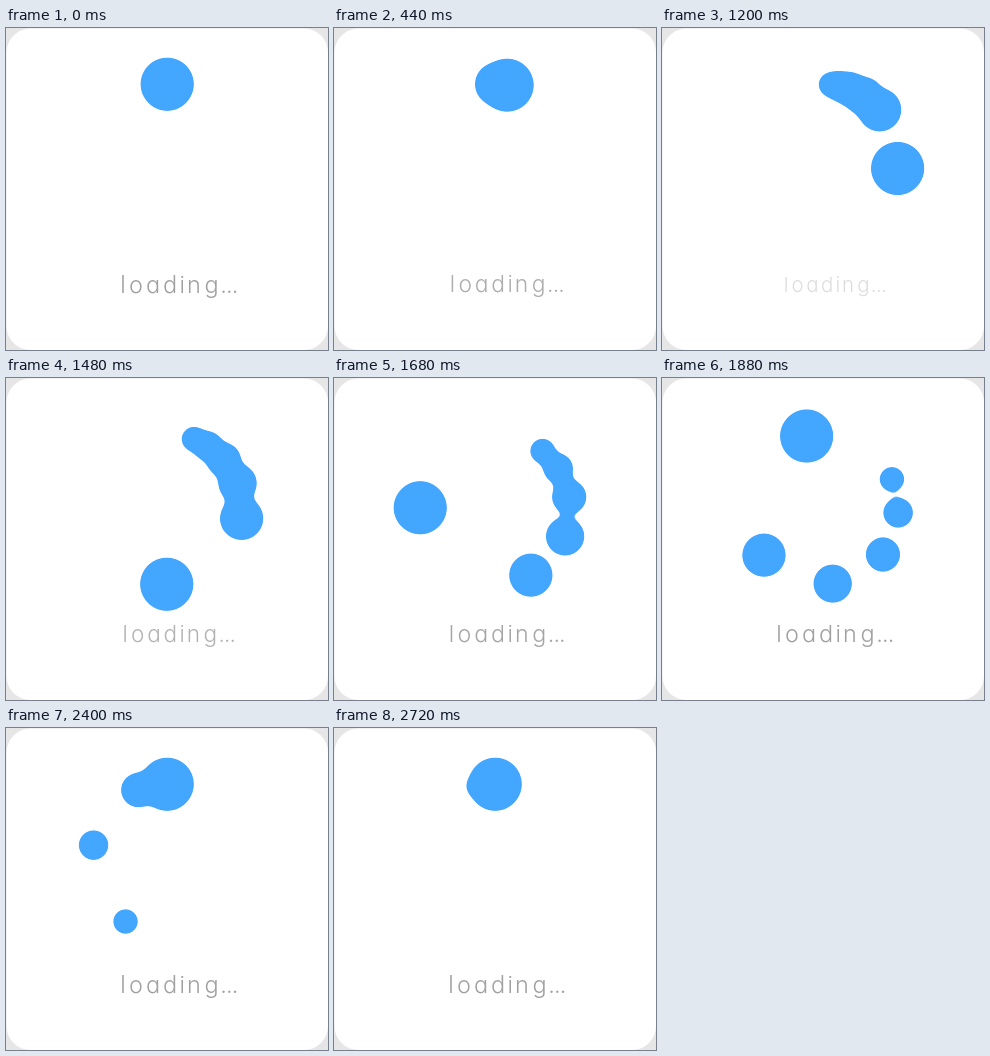
An HTML page for the animation above (3.2 s loop, 322 by 322 pixels).

```html
<!DOCTYPE html>
<html lang="en">
<head>
<meta charset="utf-8">
<title>Loading</title>
<style>
  html, body { margin: 0; width: 100%; height: 100%; overflow: hidden; background: #e6e6e6; }
  svg { display: block; width: 100%; height: 100%; }
  text {
    font: 350 23.5px Inter, "Open Sans", sans-serif;
    font-feature-settings: "cv11";
    font-optical-sizing: none;
    text-anchor: middle;
    fill: #a0a0a0;
  }
</style>
</head>
<body>
<svg viewBox="0 0 322 322" xmlns="http://www.w3.org/2000/svg">
  <defs>
    <filter id="goo" filterUnits="userSpaceOnUse" x="30" y="0" width="262" height="262" color-interpolation-filters="sRGB">
      <feGaussianBlur stdDeviation="5"/>
      <feColorMatrix values="1 0 0 0 0  0 1 0 0 0  0 0 1 0 0  0 0 0 14 -6.5"/>
    </filter>
  </defs>
  <rect x=".5" y=".5" width="321.5" height="321.5" rx="24" fill="#fff"/>
  <g id="drops" filter="url(#goo)" fill="#43a6ff"></g>
  <text id="label" y="264.5" x="117 130 147 164 176.3 188 205.5 217.5 223.3 229">loading...</text>
</svg>
<script>
const LOOP = 3200, STEP = 40, TURN = 1980, LAG = 140;
const CENTER = { x: 161.2, y: 131.2 }, ORBIT = 75;
const LABEL = { x: 173, y: 257, down: 940, up: 1940, shrink: 0.2 };
const RADII = [27, 22.1, 19.7, 17.7, 15.4, 13];

const group = document.getElementById('drops');
const label = document.getElementById('label');

const drops = RADII.map((r, i) => {
  const node = document.createElementNS('http://www.w3.org/2000/svg', 'circle');
  node.setAttribute('r', r);
  group.appendChild(node);
  return { node, delay: i ? LAG * (i + 1) : 0 };
});

// Cubic bezier easing with control points (x1, 0) and (x2, y2)
function ease(u, x1, x2, y2 = 1) {
  if (u <= 0) return 0;
  if (u >= 1) return 1;
  const curve = (s, a, b) => 3 * a * s * (1 - s) ** 2 + 3 * b * s * s * (1 - s) + s ** 3;
  let lo = 0, hi = 1;
  for (let i = 0; i < 24; i++) {
    const s = (lo + hi) / 2;
    if (curve(s, x1, x2) < u) lo = s; else hi = s;
  }
  return curve(lo, 0, y2);
}

function draw(t) {
  for (const { node, delay } of drops) {
    const a = 2 * Math.PI * ease((t - delay) / TURN, 0.84, 0.79, 0.94);
    node.setAttribute('cx', CENTER.x + ORBIT * Math.sin(a));
    node.setAttribute('cy', CENTER.y - ORBIT * Math.cos(a));
  }
  const { x, y, down, up, shrink } = LABEL;
  const shown = t < down
    ? 1 - ease(t / down, 0.882, 0.75)
    : ease((t - down) / (up - down), 0.25, 0.3);
  const scale = 1 - shrink * (1 - shown);
  label.setAttribute('opacity', shown);
  label.setAttribute('transform', `translate(${x} ${y}) scale(${scale}) translate(${-x} ${-y})`);
}

const start = performance.now();
function tick() {
  const t = (performance.now() - start) % LOOP;
  draw(Math.floor(t / STEP) * STEP);
  requestAnimationFrame(tick);
}
tick();
</script>
</body>
</html>
```
